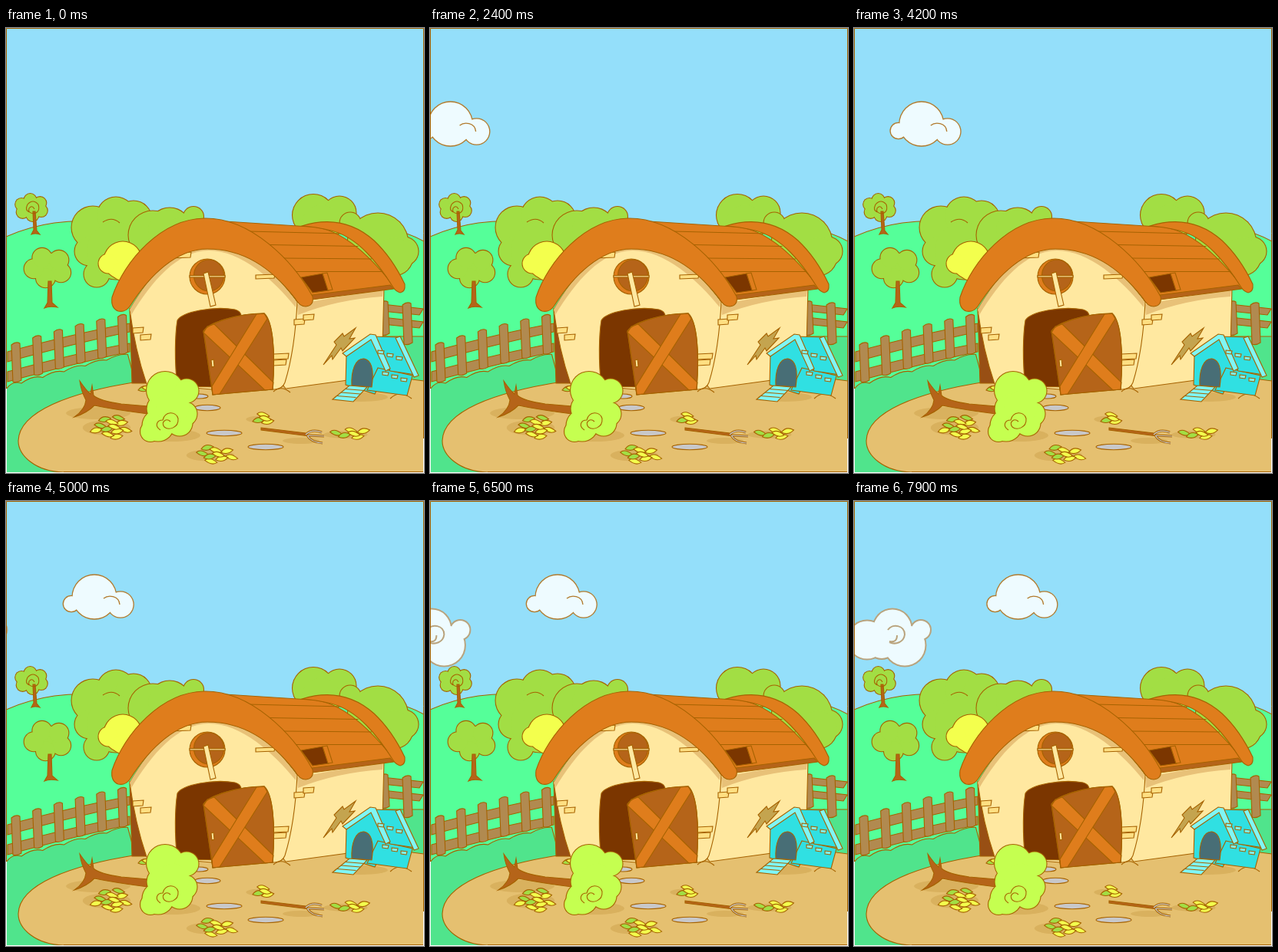
An HTML page with a canvas that plays this animation: 544x580 px, repeating every 8 s.

```html
<!DOCTYPE html>
<html lang="en">
<head>
<meta charset="utf-8">
<title>Farmyard</title>
<style>
html, body { margin: 0; width: 100%; height: 100%; overflow: hidden; }
canvas { display: block; width: 544px; height: 580px; }
</style>
</head>
<body>
<canvas id="stage" width="544" height="580"></canvas>
<script>
const W = 544, H = 580, LOOP = 8000, STEP = 100, SPEED = 0.034;
const LINE = '#a66200', ORANGE = '#df7d1c', BROWN = '#b56419', DARK = '#7b3600';
const CREAM = '#ffe8a0', TAN = '#e8c178', BRICK = '#ffdf82', LEAFY = '#a2de44';
const LIGHT = '#55ff99', SHADE = '#50e48c', DIRT = '#e5c070', SOIL = '#d9b15e';
const WOOD = '#b18a50', CYAN = '#30e0e2', PALE = '#7ff6f6', STONE = '#c8c8ca';
const YELLOW = '#f3ff4d', LIME = '#c5ff50', CLOUD = '#eefbff';

const view = document.getElementById('stage').getContext('2d');
const layer = document.createElement('canvas');
layer.width = W;
layer.height = H;
const g = layer.getContext('2d');

function shape(d, fill, stroke = LINE, width = 1.1) {
  const path = new Path2D(d);
  if (fill) { g.fillStyle = fill; g.fill(path); }
  if (stroke) { g.strokeStyle = stroke; g.lineWidth = width; g.stroke(path); }
}
const line = (d, width) => shape(d, null, LINE, width);

function oval(x, y, rx, ry, fill, stroke) {
  shape(`M${x - rx} ${y}a${rx} ${ry} 0 1 1 ${2 * rx} 0a${rx} ${ry} 0 1 1 ${-2 * rx} 0Z`, fill, stroke);
}

// Outlined union of circles [x, y, r].
function clump(ctx, circles, fill, outline = LINE, width = 1.1) {
  for (const [color, grow] of [[outline, width / 2], [fill, -width / 2]]) {
    ctx.fillStyle = color;
    for (const [x, y, r] of circles) {
      ctx.beginPath();
      ctx.arc(x, y, r + grow, 0, 2 * Math.PI);
      ctx.fill();
    }
  }
}

// Tree crown: a ring of equal lobes around a core.
function crown(x, y, rx, ry, lobes, r) {
  const circles = [[x, y, Math.max(rx, ry)]];
  for (let i = 0; i < lobes; i++) {
    const a = (i + 0.4) / lobes * 2 * Math.PI;
    circles.push([x + rx * Math.cos(a), y + ry * Math.sin(a), r]);
  }
  clump(g, circles, LEAFY);
}

// Leaves spread by the golden angle over a patch of dark soil.
function pile(x, y, rx, ry, count) {
  oval(x - 6, y + 1, rx * 1.3, ry * 0.7, SOIL, null);
  for (let i = count - 1; i >= 0; i--) {
    const a = i * 2.4, r = Math.sqrt((i + 0.3) / count);
    const lx = x + rx * r * Math.cos(a), ly = y + ry * r * Math.sin(a), s = i % 2 ? 1.5 : -1.5;
    shape(`M${lx - 8} ${ly + s}Q${lx - 2} ${ly - 7} ${lx + 8} ${ly - s}Q${lx + 1} ${ly + 6} ${lx - 8} ${ly + s}Z`,
      i % 3 === 1 ? LEAFY : YELLOW);
  }
}

function post(x, top, height) {
  shape(`M${x - 7} ${top + 3}Q${x - 1} ${top - 2} ${x + 4} ${top + 1}L${x + 6} ${top + height - 2}q-6 4 -11 2Z`, WOOD);
}

function brick(x, y, w = 14, h = 7) {
  shape(`M${x} ${y}l${w} -1l-1 ${h}l${1 - w} 1Z`, BRICK);
}

function drawHills() {
  shape('M0 272C38 255 85 247 135 254L300 300L430 250C470 252 512 261 544 278V580H0Z', LIGHT);
  clump(g, [[113, 260, 28], [143, 245, 25], [166, 249, 24], [108, 291, 19], [118, 321, 17], [143, 290, 38]], LEAFY);
  line('M126 253Q138 245 148 254');
  clump(g, [[191, 270, 32], [213, 262, 28], [244, 246, 13.5], [230, 276, 30]], LEAFY);
  clump(g, [[152, 303, 25], [133, 307, 13], [150, 317, 12]], YELLOW);
  clump(g, [[400, 244, 27.5], [434, 241, 22], [410, 256, 26]], LEAFY);
  clump(g, [[448, 254, 14], [484, 281, 40], [518, 291, 19], [505, 298, 25]], LEAFY);
}

function drawTrees() {
  crown(33, 234, 14, 10, 6, 8.5);
  shape('M35 239L36 263L33 269Q38 267 44 269L40 264L38 239Z', BROWN);
  line('M31 240Q24 238 28 230Q35 222 42 230Q45 240 36 242Q28 241 30 235Q34 230 37 236');
  crown(55, 312, 19, 14, 5, 13);
  shape('M55 330L54 358L50 365Q56 362 67 364L60 358L59 330Z', BROWN);
}

function drawFence() {
  const gap = 27.7;
  let edge = 'M0 471';
  for (let i = 0; i < 6; i++) edge += `Q${8 + gap * i} ${459 - 7 * i} ${20 + gap * i} ${463 - 7.5 * i}`;
  shape(edge + 'L200 580H0Z', SHADE);
  const rail = y => shape(`M2 ${y}Q90 ${y - 24} 161 ${y - 37}v11Q90 ${y - 11} 2 ${y + 13}Z`, WOOD);
  rail(422);
  rail(448);
  for (let i = 0; i < 6; i++) post(14 + gap * i, 410 - 9.4 * i + 0.42 * i * i, 51);

  shape('M485 402H544V500H485Z', SHADE);
  for (const y of [360, 377]) shape(`M490 ${y}L543 ${y + 6}L538 ${y + 14}L490 ${y + 9}Z`, WOOD);
  post(493, 356, 44);
  post(523, 358, 54);
}

function drawBarn() {
  shape('M161 366L164 463H190L170 380Z', '#984f14');
  shape('M379 350L492 338L489 453L364 470L356 460Z', CREAM);
  shape('M379 360L491 340L490 350Q430 354 380 374Z', TAN, null);
  shape('M161 367C190 318 220 288 262 287C310 287 350 318 379 357Q376 420 363 462Q360 470 350 471H268L183 464Q168 420 161 367Z', CREAM);
  shape('M161 367C190 318 220 285 262 285C310 285 350 316 378 357L377 364C348 328 306 290 264 290C222 291 190 330 163 374Z', TAN, null);
  brick(214, 293, 27);
  brick(325, 322, 25, 5);
  brick(375, 380);
  brick(387, 374);
  brick(165, 391);
  brick(175, 400);
  brick(348, 425, 20);
  brick(348, 433, 17);

  shape('M285 252L395 259C440 260 480 305 507 339L397 352Z', ORANGE);
  shape('M398 348L500 335L504 340L399 354Z', BROWN);
  for (let i = 0; i < 4; i++) {
    const y = 265 + 17.5 * i;
    line(`M${315 + 28 * i - 2.6 * i * i} ${y}L${438 + 22 * i - 1.5 * i * i} ${y + 3 - i}`);
  }
  shape('M384 325L412 320L420 342L399 345Z', DARK);
  shape('M412 320L418 319L425 341L419 342Z', ORANGE);
  shape('M385 258C420 247 452 253 479 277C498 295 510 315 519 334Q520 344 513 345Q507 343 504 338C485 308 458 272 423 264Q403 259 385 258Z', ORANGE);
  shape('M138 351C154 303 202 249 258 248C319 247 374 304 399 350Q401 362 390 363Q382 363 376 352C344 311 308 288 262 288C222 288 187 322 161 363Q155 371 146 369Q136 365 138 351Z', ORANGE);

  oval(262, 324, 23, 23, ORANGE);
  oval(264, 322.5, 19.5, 20.5, BROWN);
  shape('M239 322.5H285V325H239Z', TAN);
  shape('M257 320L263 318L273 361L266 363Z', CREAM);

  shape('M223 467C219 435 220 399 223 381C229 370 270 362 298 367Q306 369 306 376L272 468Z', DARK);
  const door = 'M269 478L257 395C264 384 302 372 336 372C347 382 351 420 347 471Z';
  shape(door, BROWN);
  shape('M257 397L262 389L271 386L348 462L347 471L337 472Z', ORANGE);
  shape('M326 373L336 372L340 379L278 477L269 478L268 467Z', ORANGE);
  line(door);
  shape('M267 433L270 432L271 441L268 442Z', CREAM);
  line('M348 474Q358 465 370 475');
}

function drawKennel() {
  shape('M413 439L430 413L427 409L438 398L440 402L455 391L447 405L454 404L438 421L436 417L425 432L424 427Z', '#c4a44f');
  oval(462, 481, 35, 6, SOIL, null);
  shape('M443 425L476 403L496 445L480 477L442 465Z', CYAN);
  shape('M484 443L529 453L522 479L470 472Z', CYAN);
  shape('M476 402L511 403L534 452L500 447Z', CYAN);
  shape('M450 466C449 446 455 430 466 431C476 433 479 447 476 468Z', '#486e76');
  shape('M438 424L474 399L481 400L500 444L494 447L475 406L443 428Z', PALE);
  shape('M507 404L513 402L537 453L531 455Z', PALE);
  for (let i = 0; i < 6; i++) {
    const x = 484 + 6 * i, y = 420 + 26 * (i % 2) + 2 * i;
    shape(`M${x} ${y}l8 1l-1 4l-7 -1Z`, PALE);
  }
  shape('M425 484L447 466L470 468L452 487Z', PALE);
  for (let i = 1; i < 4; i++) line(`M${425 + 5.5 * i} ${484 - 4.5 * i}l25 2`);
}

function drawGround() {
  shape('M75 579C38 578 16 557 16 538C17 500 82 475 172 461L490 453L544 460V579Z', DIRT);
  line('M500 483Q512 471 528 483');
}

function drawYard() {
  oval(120, 502, 42, 8, SOIL, null);
  oval(215, 531, 38, 8, SOIL, null);
  oval(384, 538, 24, 4, SOIL, null);
  oval(251, 480, 12, 3, STONE);
  oval(262, 495, 17, 3.7, STONE);
  oval(284, 528, 23, 3.7, STONE);
  oval(338, 546, 23, 3.7, STONE);
  pile(183, 470, 5, 1, 2);
  shape('M96 460Q104 472 110 477L112 466L114 479Q122 486 150 490L185 493V503Q145 498 115 492Q105 502 89 507Q103 497 104 485Q98 474 96 460Z', BROWN);
  clump(g, [[207, 472, 24.5], [235, 473, 16], [233, 503, 16], [226, 515, 17], [198, 518, 21],
    [188, 526, 13.5], [202, 496, 19], [217, 494, 22]], LIME);
  line('M201 524C193 519 196 511 204 511C207 499 221 499 224 509C225 521 212 525 206 520C201 513 209 508 214 513');
  pile(137, 520, 24, 14, 12);
  pile(272, 556, 24, 11, 9);
  pile(334, 509, 12, 6, 4);
  pile(448, 529, 22, 7, 6);
  shape('M332 521L390 528L395 532L332 524Z', BROWN);
  const tines = 'M390 530Q398 522 411 527M393 531L414 532M392 531Q397 540 412 541';
  line(tines, 3);
  shape(tines, null, STONE, 1.2);
}

function drawFrame() {
  g.fillStyle = '#fff';
  g.fillRect(0, 470, 1, H - 470);
  g.fillRect(W - 1, 535, 1, H - 535);
  g.fillRect(0, H - 1, W, 1);
  shape('M.5 470V.5H543.5V535M75 578.5H543', null, LINE, 1);
}

function cloud(x, circles, curl, color, width) {
  view.save();
  view.translate(x, 0);
  clump(view, circles, CLOUD, color, width);
  view.strokeStyle = color;
  view.lineWidth = width;
  view.stroke(new Path2D(curl));
  view.restore();
}

function draw(now) {
  const drift = SPEED * Math.floor((now % LOOP) / STEP) * STEP;
  view.fillStyle = '#94dffa';
  view.fillRect(0, 0, W, H);
  cloud(drift - 109, [[54, 125, 29], [24, 134, 10.7], [88, 135, 17.2]],
    'M66 127C72 122 86 123 87 135', '#b27a2c', 1.3);
  cloud(drift - 268.6, [[50, 166, 25.5], [87, 168, 13], [66, 188, 27.5], [36, 186, 20], [17, 181, 25.5], [-12, 184, 18]],
    'M44 168C50 159 66 162 66 174C65 184 54 188 46 184M46 183Q56 185 56 175', '#b9a37d', 2);
  view.drawImage(layer, 0, 0);
  requestAnimationFrame(draw);
}

drawHills();
drawTrees();
drawFence();
drawGround();
drawBarn();
drawKennel();
drawYard();
drawFrame();
requestAnimationFrame(draw);
</script>
</body>
</html>
```
